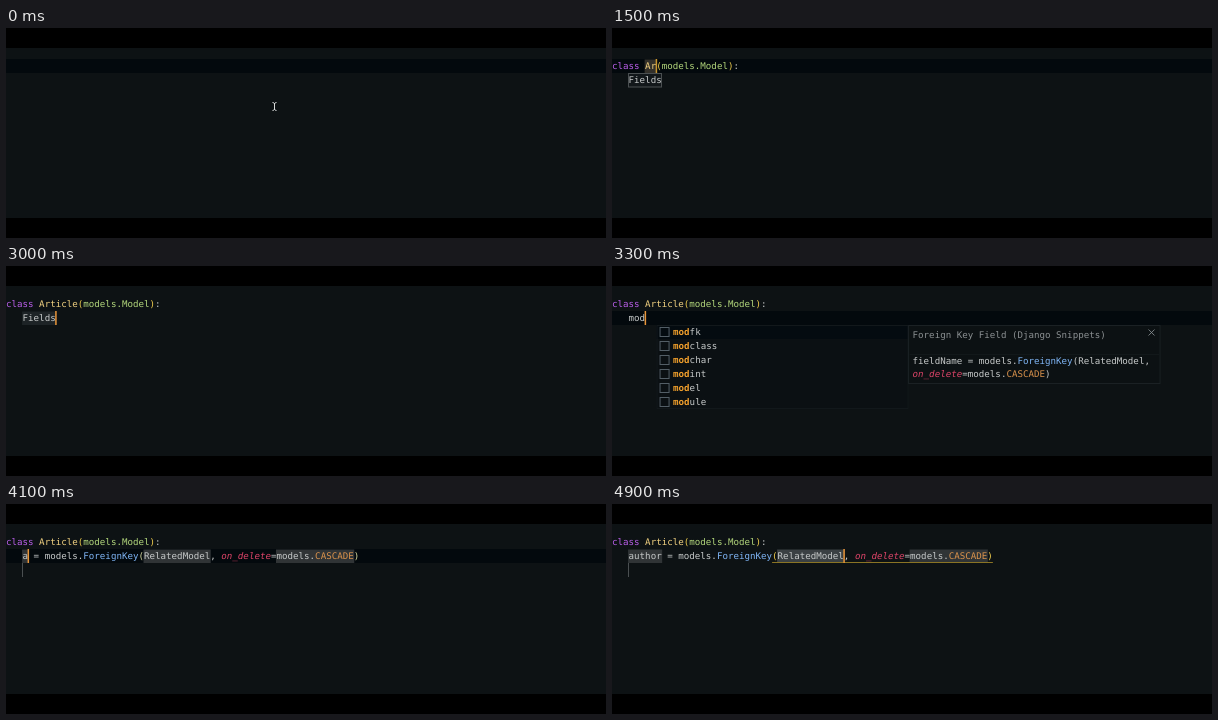
An HTML page with a canvas for the animation above (5000 ms loop, 600 px wide and 210 px high).

```html
<!DOCTYPE html>
<html lang="en">
<head>
<meta charset="utf-8">
<title>Editor snippets</title>
<style>
html, body { margin: 0; width: 100%; height: 100%; overflow: hidden; background: #000; }
canvas { display: block; width: 600px; height: 210px; }
</style>
</head>
<body>
<canvas id="stage"></canvas>
<script>
const canvas = document.getElementById('stage');
const ctx = canvas.getContext('2d');
const dpr = window.devicePixelRatio || 1;
canvas.width = 600 * dpr;
canvas.height = 210 * dpr;

const LOOP = 5000;
const CW = 5.52, LH = 14, TOP = 31, INDENT = 3 * CW;
const FONT = '9.17px "DejaVu Sans Mono", monospace';
const C = {
  editor: '#0d1214', line: '#03090d', text: '#c6c9c9', dim: '#8b9092',
  key: '#b95ee8', name: '#f0d080', type: '#b3d77c', gold: '#f2cf4e',
  call: '#7fb5f5', arg: '#dc4468', konst: '#d9924c', caret: '#e8953a',
  match: '#f2a02c', select: '#3a4043', slot: '#303436', edge: '#4a4f51'
};
const ITEMS = ['modclass', 'modfk', 'modchar', 'modint', 'model', 'module',
  'map', 'max', 'memoryview', 'min'];

function rect(x, y, w, h, color) {
  ctx.fillStyle = color;
  ctx.fillRect(x, y, w, h);
}

function frame(x, y, w, h, color) {
  ctx.strokeStyle = color;
  ctx.lineWidth = 1;
  ctx.strokeRect(x + 0.5, y + 0.5, w - 1, h - 1);
}

// Draws [text, color, style] runs on a fixed character grid; returns the end x.
function runs(x, y, parts) {
  for (const [str, color, style = ''] of parts) {
    ctx.font = style + ' ' + FONT;
    ctx.fillStyle = color;
    for (const ch of str) {
      ctx.fillText(ch, x, y);
      x += CW;
    }
  }
  return x;
}

const rowY = row => TOP + row * LH;
const baseY = row => 41 + row * 13.8;
const lineBand = row => rect(0, rowY(row), 600, LH, C.line);
const slot = (x, row, len, color) => rect(x - 0.5, rowY(row) + 0.5, len * CW + 1, 13.5, color);
const caret = (x, row, color = C.caret) => rect(x - 0.5, rowY(row), 1.5, LH, color);

const classParts = (name, paren) => [
  ['class ', C.key], [name, C.name], ['(', paren],
  ['models.Model', C.type], [')', paren], [':', C.text]
];

const fieldParts = (name, paren) => [
  [name + ' = models.', C.text], ['ForeignKey', C.call], ['(', paren],
  ['RelatedModel, ', C.text], ['on_delete', C.arg, 'italic'],
  ['=models.', C.text], ['CASCADE', C.konst], [')', paren]
];

function suggest(x, y, typed, first, rows, title, code) {
  const list = [first, ...ITEMS.filter(s => s !== first)]
    .filter(s => s.startsWith(typed)).slice(0, rows);
  const h = list.length * LH;
  rect(x, y, 252, h, '#0b1013');
  rect(x, y, 252, LH, '#040b10');
  frame(x, y, 252, h, '#12181b');
  list.forEach((s, i) => {
    const ty = y + i * LH;
    frame(x + 3, ty + 2, 10, 10, '#535e66');
    runs(x + 16.5, ty + 10, [
      [typed, C.match, 'bold'], [s.slice(typed.length), C.text]
    ]);
  });

  const dx = x + 252;
  rect(dx, y, 252, 59, '#0c1113');
  frame(dx - 0.5, y, 252.5, 59, '#1b2124');
  rect(dx + 1, y + 29, 250, 1, '#12181a');
  runs(dx + 4, y + 13, [[title + ' (Django Snippets)', C.dim]]);
  code.forEach((parts, i) => runs(dx + 4, y + 39 + i * 13.3, parts));

  ctx.strokeStyle = '#90979a';
  ctx.lineWidth = 0.8;
  ctx.beginPath();
  for (const s of [-1, 1]) {
    ctx.moveTo(dx + 240, y + 7.5 - 3 * s);
    ctx.lineTo(dx + 246, y + 7.5 + 3 * s);
  }
  ctx.stroke();
}

function pointer(x, y) {
  ctx.strokeStyle = '#d8dada';
  ctx.lineWidth = 1;
  ctx.beginPath();
  ctx.moveTo(x, y - 3.5);
  ctx.lineTo(x, y + 3.5);
  for (const s of [-1, 1]) {
    ctx.moveTo(x - 2, y + 4 * s);
    ctx.lineTo(x - 0.5, y + 3.5 * s);
    ctx.moveTo(x + 2, y + 4 * s);
    ctx.lineTo(x + 0.5, y + 3.5 * s);
  }
  ctx.stroke();
}

// Letters typed so far, one per step.
const typing = (word, t, start, step = 100) =>
  word.slice(0, Math.max(0, Math.floor((t - start) / step) + 1));

function typePrefix(t) {
  lineBand(0);
  const word = typing('modclass', t, 300);
  if (!word) return pointer(268.5, 78.5);
  caret(runs(0, baseY(0), [[word, C.text]]), 0, '#e0705a');
  suggest(28, rowY(1), word, 'modclass', 8, 'Model Class Setup', [
    classParts('ClassName', C.text), [['   Fields', C.text]]
  ]);
}

function nameClass(t) {
  const typed = t < 1500 ? typing('A', t, 1400)
    : t < 1700 ? 'Ar' : typing('Article', t, 1500);
  const word = t < 1700 ? typed : 'Art' + typing('icle', t, 1800);
  const name = word || 'ClassName';
  const x = 6 * CW;
  if (word) lineBand(0);
  slot(x, 0, name.length, word ? '#33302a' : C.select);
  runs(0, baseY(0), classParts(name, C.gold));
  caret(x + name.length * CW, 0, word ? '#c9962f' : C.caret);
  rect(16, rowY(1), 34, 14.5, '#12171a');
  frame(16, rowY(1), 34, 14.5, C.edge);
  runs(INDENT, baseY(1), [['Fields', C.text]]);
}

function typeField(t) {
  const word = typing('modfk', t, 3100);
  if (word) lineBand(1);
  else slot(INDENT, 1, 6, '#1d2326');
  runs(0, baseY(0), classParts('Article', C.gold));
  caret(runs(INDENT, baseY(1), [[word || 'Fields', C.text]]), 1);
  if (!word) return;
  const [head, tail] = [fieldParts('fieldName', C.text).slice(0, 4),
    fieldParts('', C.text).slice(4)];
  suggest(28 + INDENT, rowY(2), word, 'modfk', 10, 'Foreign Key Field', [head, tail]);
}

function nameField(t) {
  const word = typing('aut', t, 4000, 200) +
    (t < 4500 ? '' : typing('hor', t, 4500));
  const name = word || 'fieldName';
  const done = t >= 4800;
  const col = n => INDENT + (name.length + n) * CW;
  const paren = done ? C.gold : word ? '#d9dba0' : C.text;
  if (word && !done) lineBand(1);
  slot(INDENT, 1, name.length, word ? C.slot : C.select);
  slot(col(21), 1, 12, done ? C.select : C.slot);
  slot(col(45), 1, 14, C.slot);
  if (done) rect(col(20), 58, 40 * CW, 1, '#8a7424');
  runs(0, baseY(0), classParts('Article', C.gold));
  runs(INDENT, baseY(1), fieldParts(name, paren));
  caret(done ? col(33) : col(0), 1);
  rect(16, rowY(2), 1, LH, C.edge);
}

function draw(t) {
  ctx.setTransform(dpr, 0, 0, dpr, 0, 0);
  ctx.textRendering = 'geometricPrecision';
  rect(0, 0, 600, 210, '#000');
  rect(0, 20, 600, 170, C.editor);
  ctx.save();
  ctx.beginPath();
  ctx.rect(0, 20, 600, 170);
  ctx.clip();
  if (t < 1100) typePrefix(t);
  else if (t < 2200) nameClass(t);
  else if (t < 3600) typeField(t);
  else nameField(t);
  ctx.restore();
}

const start = performance.now();
function tick() {
  draw((performance.now() - start) % LOOP);
  requestAnimationFrame(tick);
}
tick();
</script>
</body>
</html>
```
